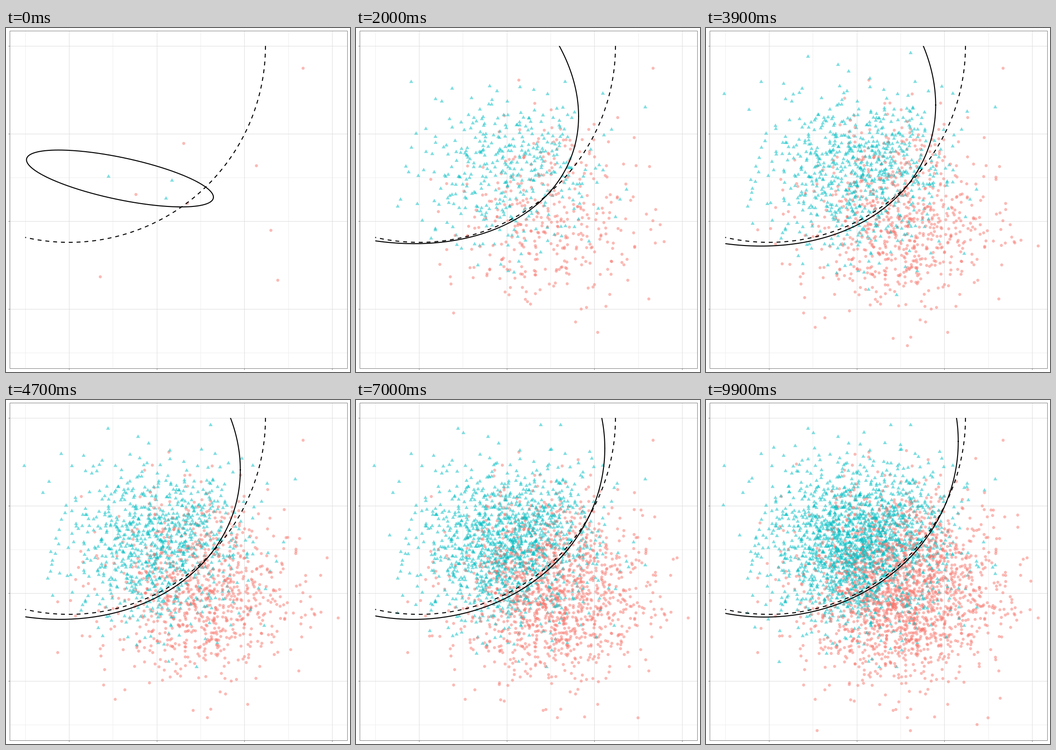
Animation of 748 by 748 pixels, one loop 10 s. Source, as a matplotlib script:

```python
import matplotlib.pyplot as plt
import numpy as np
from matplotlib.animation import FuncAnimation
from matplotlib.collections import PathCollection
from matplotlib.patches import Rectangle
from matplotlib.path import Path
from matplotlib.transforms import IdentityTransform

SIZE, FRAMES, STEP = 748, 100, 38
PX = 0.72  # points per pixel at 100 dpi
LEFT, TOP, RIGHT, BOTTOM = 8.25, 5.5, 742.5, 739.75
UNIT = (RIGHT - LEFT) / 7.7  # 7 data units plus 5 % padding on each side
COLORS = np.array(["#F8766D", "#00BFC4"])

# Sample clouds in data units: red, teal.
MEAN = np.array([(1.06, 0.06), (0.06, 1.09)])
SPREAD = np.array([(1.07, 1.03), (1.0, 0.89)])

# The ten samples of the opening, in pixels.
FIRST_RED = [(646, 87.5), (386.5, 251), (544.5, 299.5), (282.5, 362),
             (394.5, 381.5), (576, 440), (591, 548.5), (205, 541)]
FIRST_TEAL = [(223, 322), (361, 330.5), (348, 369.5)]

# Fitted boundary: rightmost point, lowest point, skew.
OPENING = np.array((451, 367.8, 381.3, 389, 0.657))
KEYS = [20, 30, 47, 70, 87, 99]
POSES = np.array([
    (484, 192, 127, 469, 0.23),
    (488, 185, 122, 471, 0.30),
    (509.5, 152, 118, 477, 0.10),
    (541, 105, 125, 477, 0),
    (548.5, 95, 108, 479, 0),
    (548.5, 90, 128, 472, 0),
])


def gx(v):
    return LEFT + (v + 3.35) * UNIT


def gy(v):
    return TOP + (4.35 - v) * UNIT


def make_samples():
    rng = np.random.default_rng(12)
    n = STEP * (FRAMES - 1)
    kind = rng.integers(0, 2, n)
    z = np.clip(rng.normal(size=(n, 2)), -3.1, 3.1)
    x, y = (MEAN[kind] + SPREAD[kind] * z).T
    pos = np.column_stack([gx(x), gy(y)])
    first = [0] * len(FIRST_RED) + [1] * len(FIRST_TEAL)
    return np.append(first, kind), np.vstack([FIRST_RED, FIRST_TEAL, pos])


def fitted_curve(i):
    late = np.array([np.interp(i, KEYS, col) for col in POSES.T])
    rx, ry, bx, by, c = late + (OPENING - late) * np.exp(-1.5 * i)
    hx, hy = (rx - bx) / (1 - c), (by - ry) / (1 - c)
    t = np.linspace(0, 2 * np.pi, 361)
    return rx - hx + hx * np.cos(t), by - hy + hy * np.cos(t - np.arccos(c))


fig = plt.figure(figsize=(SIZE / 100, SIZE / 100), dpi=100, facecolor="white")
ax = fig.add_axes([0, 0, 1, 1])
ax.set(xlim=(0, SIZE), ylim=(SIZE, 0))
ax.axis("off")


def rule(xs, ys, color):
    ax.plot(xs, ys, color=color, lw=PX, zorder=1, solid_capstyle="butt")


for v in (-3, -1, 1, 3):
    rule([gx(v)] * 2, [TOP, BOTTOM], "#eeeeee")
for v in (-3, 1):
    rule([LEFT, RIGHT], [gy(v)] * 2, "#eeeeee")
for v in (-2, 0, 2, 4):
    rule([gx(v)] * 2, [TOP, BOTTOM], "#dcdcdc")
    rule([LEFT, RIGHT], [gy(v)] * 2, "#dcdcdc")
    rule([gx(v)] * 2, [BOTTOM, BOTTOM + 2.75], "#7b7b7b")
    rule([LEFT - 2.75, LEFT], [gy(v)] * 2, "#7b7b7b")
ax.add_patch(Rectangle((8.5, 5.5), 734, 734, fill=False, ec="#7b7b7b",
                       lw=PX, zorder=5))

kind, pos = make_samples()
shapes = [Path.circle((0, 0), 3.3),
          Path([(0, 3.9), (4.3, -3.6), (-4.3, -3.6), (0, 3.9)], closed=True)]
paths = [shapes[k] for k in kind]
dots = PathCollection(paths, offsets=pos, offset_transform=ax.transData,
                      facecolors=list(COLORS[kind]), edgecolors="none",
                      alpha=0.5, transform=IdentityTransform(), zorder=2)
ax.add_collection(dots, autolim=False)

# True boundary: a circle around (-2, 4), seen from x = -3 on.
r = 4.48 * UNIT
a = np.linspace(0, np.pi / 2 + np.arcsin(UNIT / r), 300)
ax.plot(gx(-2) + r * np.cos(a), gy(4) + r * np.sin(a), color="black",
        lw=2.125 * PX, ls=(0, (4, 4)), dash_capstyle="butt", zorder=3)

fit, = ax.plot([], [], color="black", lw=2.125 * PX, zorder=4)
fit.set_clip_path(Rectangle((gx(-3), gy(4)), 7 * UNIT, 7 * UNIT,
                            transform=ax.transData))


def draw(i):
    n = len(FIRST_RED) + len(FIRST_TEAL) + STEP * i
    dots.set_paths(paths[:n])
    dots.set_offsets(pos[:n])
    fit.set_data(*fitted_curve(i))
    return dots, fit


anim = FuncAnimation(fig, draw, frames=FRAMES, interval=100, repeat=True,
                     repeat_delay=0)
plt.show()
```
